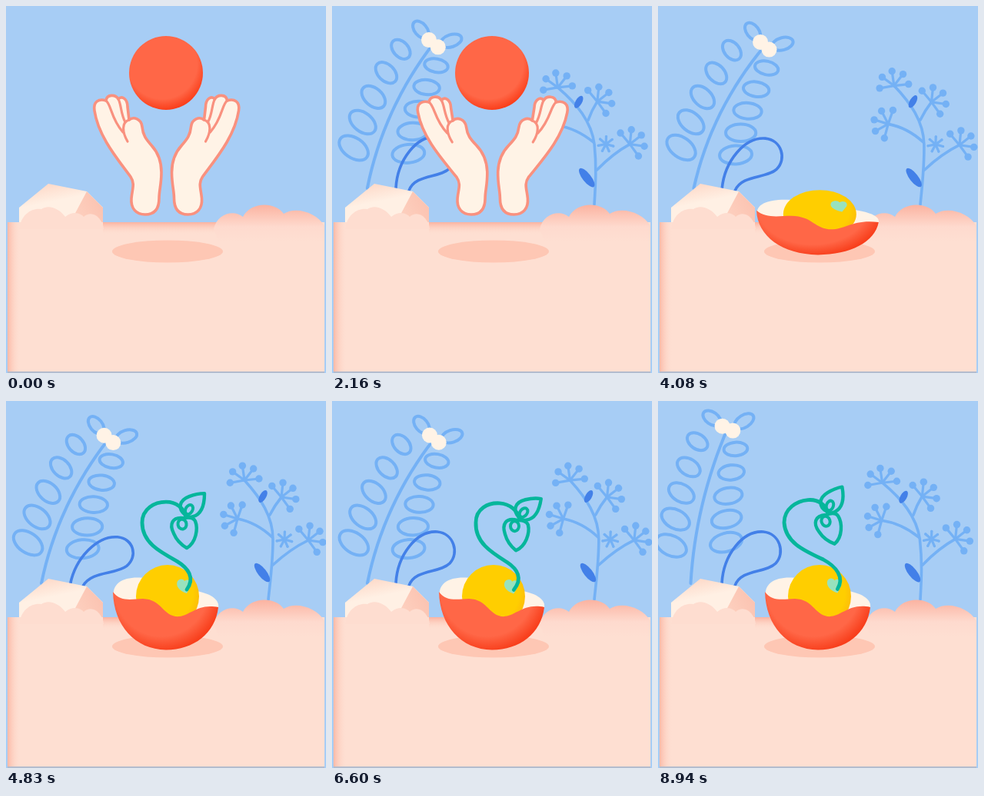
Animation, 416 px wide and 477 px high, one loop 8970 ms. Source, as an HTML page:

```html
<!DOCTYPE html>
<html lang="en">
<head>
<meta charset="utf-8">
<title>Sprouting egg</title>
<style>
  html, body { margin: 0; width: 100%; height: 100%; overflow: hidden; background: #a7cdf5; }
  svg { display: block; width: 100vw; height: 100vh; }
</style>
</head>
<body>
<svg viewBox="0 0 416 477">
  <defs>
    <radialGradient id="red" cx=".45" cy=".38" r=".63">
      <stop offset=".75" stop-color="#ff6747"/><stop offset="1" stop-color="#fa3c18"/>
    </radialGradient>
    <radialGradient id="bowl" gradientUnits="userSpaceOnUse" cx="202" cy="245" r="80">
      <stop offset=".76" stop-color="#ff6747"/><stop offset="1" stop-color="#f83f1c"/>
    </radialGradient>
    <radialGradient id="yolk" cx=".42" cy=".45" r=".6">
      <stop offset=".8" stop-color="#ffce00"/><stop offset="1" stop-color="#fdbd08"/>
    </radialGradient>
    <linearGradient id="top" x2="0" y2="1">
      <stop stop-color="#fbab97" stop-opacity=".85"/><stop offset="1" stop-color="#fedfd2" stop-opacity="0"/>
    </linearGradient>
    <linearGradient id="side">
      <stop stop-color="#fbb5a2" stop-opacity=".9"/><stop offset="1" stop-color="#fedfd2" stop-opacity="0"/>
    </linearGradient>
    <linearGradient id="bush" x2="0" y2="1">
      <stop stop-color="#fbb3a1"/><stop offset=".6" stop-color="#fedace"/><stop offset="1" stop-color="#fedfd2"/>
    </linearGradient>
    <linearGradient id="facet" x1="1" x2="0" y2=".6">
      <stop stop-color="#fbc0ae"/><stop offset="1" stop-color="#fdd0bf"/>
    </linearGradient>
    <linearGradient id="rock" x2=".4" y2="1">
      <stop stop-color="#fdd3c1"/><stop offset=".5" stop-color="#fff0e4"/>
    </linearGradient>
  </defs>
  <rect width="416" height="477" fill="#a7cdf5"/>
  <g id="plants"></g>
  <g id="ground">
    <path d="M17,284 V262 L55,231 L105,241 L126,262 V286 Z" fill="url(#rock)"/>
    <path d="M105,241 L126,262 V286 H100 L88,273 Z" fill="url(#facet)"/>
    <rect x="2" y="281" width="412" height="194" fill="#fedfd2"/>
    <rect x="2" y="475" width="412" height="2" fill="#b4bccd"/>
    <rect x="126" y="281" width="150" height="16" fill="url(#top)"/>
    <rect x="2" y="281" width="17" height="194" fill="url(#side)"/>
    <path d="M17,290 C20,270 34,262 46,264 C56,257 70,264 77,274 C90,264 99,272 101,274 C112,264 126,276 127,290 Z" fill="#feddd0"/>
    <path d="M270,290 C274,270 296,264 308,274 C318,254 350,254 361,270 C376,260 404,268 414,286 V306 H276 Z" fill="url(#bush)"/>
  </g>
  <g id="actors"></g>
</svg>
<script>
const LOOP = 8970, LAND = 4080;
const SKY_LINE = '#74b1f5', DEEP = '#4380e8', GREEN = '#06b69b', CREAM = '#fff3e6', SKIN_LINE = '#f9917f';
const plants = document.getElementById('plants'), actors = document.getElementById('actors');
const RAD = Math.PI / 180;
const clamp = x => Math.max(0, Math.min(1, x));
const ramp = (t, from, to) => { const x = clamp((t - from) / (to - from)); return x * x * (3 - 2 * x); };

// Eases from one [time, value] pose to the next.
function poses(keys, t) {
  let value = keys[0][1];
  for (let i = 1; i < keys.length; i++)
    value += (keys[i][1] - keys[i - 1][1]) * ramp(t, keys[i - 1][0], keys[i][0]);
  return value;
}

const warp = (d, move) => d.replace(/(-?[\d.]+),(-?[\d.]+)/g,
  (_, x, y) => move(+x, +y).map(v => v.toFixed(2)).join(','));
const stroke = (d, color, width, part = 1) => part <= 0 ? '' :
  `<path d="${d}" pathLength="1" fill="none" stroke="${color}" stroke-width="${width}" stroke-linecap="round" stroke-linejoin="round"${part < 1 ? ` stroke-dasharray="${part} 2"` : ''}/>`;
const shape = (d, fill, extra = '') => `<path d="${d}" fill="${fill}" ${extra}/>`;
const oval = (x, y, rx, ry, turn, style, scale = 1) => scale <= 0 ? '' :
  `<ellipse rx="${rx}" ry="${ry}" transform="translate(${x} ${y}) rotate(${turn}) scale(${scale})" ${style}/>`;
const outline = color => `fill="none" stroke="${color}" stroke-width="4"`;
const fill = color => `fill="${color}"`;

const FERN_LEAN = [[1200, 22], [3330, 28], [4830, 25], [5400, 19], [7980, 32], [8940, 13.4]];

function fern(t) {
  const grow = ramp(t, 100, 1150), lean = poses(FERN_LEAN, t), bend = .3 * lean + 6;
  const rootX = 41 + 25 * Math.sin((lean - bend) * RAD);
  const at = (u, side = 0, ahead = 0) => {
    const mean = (lean - bend + bend * u) * RAD, turn = lean - bend + 2 * bend * u;
    const c = Math.cos(turn * RAD), s = Math.sin(turn * RAD);
    return [rootX + 207 * u * Math.sin(mean) + side * c + ahead * s,
      237 - 207 * u * Math.cos(mean) + side * s - ahead * c, turn];
  };
  const leaf = (u, side, ahead, rx, ry, tilt) => {
    const k = clamp((grow * 1.2 - u) / .2), [x, y, turn] = at(Math.min(u, grow), side * k, ahead * k);
    return oval(x, y, rx, ry, turn + tilt, outline(SKY_LINE), k);
  };
  const points = Array.from({ length: 17 }, (_, i) => at(grow * i / 16).slice(0, 2).join(','));
  let out = grow ? stroke('M' + points.join('L'), SKY_LINE, 4) : '';
  for (let i = 0; i < 5; i++)
    out += leaf(.2 + .16 * i, -30, 4, 21 - 1.6 * i, 13 - .8 * i, 18 - i)
      + leaf(.28 + .14 * i, 40 - 5 * i, 2 + 2.5 * i, 21 - 1.4 * i, 12 - .8 * i, -24);
  out += leaf(1, -24, 4, 13, 8, 12) + leaf(1, 16, 17, 14, 8, -56);
  for (const side of [-7.5, 7.5])
    out += oval(...at(1, side).slice(0, 2), 10, 10, 0, fill(CREAM), clamp(grow * 6 - 5));
  return out;
}

// Each branch ends in an umbel that opens towards the given angle.
const BRANCHES = [
  ['M341,258 C344,230 347,208 347,180 C347,150 331,126 310,103', -98],
  ['M343,148 Q349,136 358,125', -38],
  ['M346,177 Q326,158 301,153', -163],
  ['M347,213 Q370,192 393,181', -38]
];
const BRANCH_SWAY = [[2160, -17], [4830, 0], [7980, -1], [8940, -19]];

function umbels(t) {
  const sway = poses(BRANCH_SWAY, t), bloom = ramp(t, 800, 1250);
  const move = (x, y) => {
    const dx = sway * Math.pow(Math.max(0, 258 - y) / 158, 1.5);
    return [x + dx, y + dx * (x - 345) / 200];
  };
  const rays = (x, y, count, length, from, step, dot) => {
    let out = '';
    for (let i = 0; i < count && bloom > 0; i++) {
      const a = (from + step * i) * RAD;
      const px = x + length * bloom * Math.cos(a), py = y + length * bloom * Math.sin(a);
      out += stroke(`M${x},${y} L${px},${py}`, SKY_LINE, 3.2) + oval(px, py, dot, dot, 0, fill(SKY_LINE), bloom);
    }
    return out;
  };
  let out = '';
  BRANCHES.forEach(([path, aim], i) => {
    const d = warp(path, move), [x, y] = d.split(' ').pop().split(',').map(Number);
    out += stroke(d, SKY_LINE, 3.6, ramp(t, i ? 550 : 150, 950)) + rays(x, y, 5, 19, aim - 92, 46, 4.7);
  });
  return out + rays(...move(362, 180), 7, 10, 15, 360 / 7, 1.6)
    + oval(...move(334, 124), 4.2, 9, 30, fill(DEEP), bloom)
    + oval(...move(333, 223), 5.5, 15, -38, fill(DEEP), bloom);
}

const TENDRIL = 'M83,237 C85,200 110,168 137,170 C158,172 166,197 153,211 C140,224 108,218 100,240';
function tendril(t) {
  const sway = 8 * Math.exp(-(((t - 4830) / 700) ** 2));
  const move = (x, y) => { const k = sway * clamp((242 - y) / 62); return [x + k, y + k * .85]; };
  return stroke(warp(TENDRIL, move), DEEP, 3.6, ramp(t, 200, 1200));
}

const HAND = 'M181,271 C169,271 162,263 163,250 C164,238 168,231 162,222 C146,200 120,170 115,136 C113,124 121,120 130,123 C131,114 143,115 146,121 C151,116 158,121 158,131 L160,148 C166,143 176,147 177,157 C178,168 182,173 189,181 C199,192 202,203 202,216 C202,232 199,240 199,250 C199,264 193,271 181,271 Z';
const CREASES = ['M130,123 C137,128 136,146 152,164', 'M146,121 C150,128 149,140 155,151', 'M160,148 C150,151 151,164 158,176'];
const TOSS = [[2600, 0], [2950, -20], [3330, 99], [3620, 330]];

function hands(t) {
  if (t > 3620) return '';
  const rise = poses(TOSS, t), lift = Math.max(0, rise);
  const angle = Math.min(18, 2.2 * Math.sin(Math.PI * t / 4320) + .125 * lift);
  const move = (x, y) => {
    const a = -angle * ramp(-y, -262, -195) * RAD, c = Math.cos(a), s = Math.sin(a), dx = x - 182, dy = y - 222;
    return [182 + dx * c - dy * s - .16 * lift, 222 + dx * s + dy * c - rise];
  };
  const hand = shape(warp(HAND, move), CREAM, `stroke="${SKIN_LINE}" stroke-width="3.6" stroke-linejoin="round"`)
    + CREASES.map(d => stroke(warp(d, move), SKIN_LINE, 3.2)).join('');
  return hand + `<g transform="translate(417.5 0) scale(-1 1)">${hand}</g>`;
}

const ballY = t => t < 3700 ? 87 - .93 * poses(TOSS, t) : 445 * ((t - 3700) / (LAND - 3700)) ** 2 - 170;

const SHELL_BACK = 'M140,255 C137,234 158,226 186,231 L248,247 C268,251 278,259 276,269 L222,290 Z';
const SHELL_FRONT = 'M139,248 C149,262 165,257 178,257 C202,258 202,276 220,280 C238,282 247,262 276,268 C272,302 244,323.500 208,323.500 C168,323 140,292 139,248 Z';
const SPROUT = 'M235,245 C246,230 237,217 222,208 C200,196 177,184 177,158 C177,140 193,131 208,131 C222,131 231,140 233,148';
const SPROUT_LEAVES = [
  'M233,148 C223,140 225,129 238,124 Q248,120 258,120 C258,135 254,147 243,150 Q237,152 233,148 Z',
  'M231,152 C216,150 212,160 218,172 Q223,184 235,191 C247,184 250,166 246,156 C243,150 236,151 231,152 Z'
];
const SEED = 'M235,250 C225,247 220,240 223,234 C226,230 231,231 232,234 C238,230 242,235 240,241 Z';
const SPROUT_SWAY = [[4830, 0], [6600, 10], [7980, -15], [8940, -13]];

function sprout(t) {
  const sway = poses(SPROUT_SWAY, t), open = ramp(t, 4560, 4820);
  const move = (x, y) => {
    const k = sway * (.12 + .88 * ramp(-y, -250, -165));
    return [x + k, y + k * .33 * clamp((x - 180) / 50)];
  };
  const [x, y] = move(233, 149);
  const leaves = open <= 0 ? '' :
    `<g transform="translate(${x} ${y}) rotate(${sway * .8}) scale(${open}) translate(-233 -149)">`
    + SPROUT_LEAVES.map(d => stroke(d, GREEN, 4.4)).join('')
    + oval(238, 141, 4.5, 6.5, 30, outline(GREEN)) + oval(229, 160, 5.5, 6.5, -10, outline(GREEN)) + '</g>';
  return shape(warp(SEED, move), '#98e2bd') + stroke(warp(SPROUT, move), GREEN, 4.8, ramp(t, 4220, 4680)) + leaves;
}

function egg(t) {
  const age = t - LAND, squash = Math.exp(-age / 130) * Math.cos(age / 62);
  return `<g transform="translate(208 323) scale(${1 + .16 * squash} ${1 - .24 * squash}) translate(-208 -323)">`
    + shape(SHELL_BACK, CREAM) + oval(210, 254, 41, 41, 0, fill('url(#yolk)'))
    + shape(SHELL_FRONT, 'url(#bowl)') + sprout(t) + '</g>';
}

function draw(t) {
  const y = ballY(t), shadow = clamp(1 - (87 - y) * .005);
  plants.innerHTML = fern(t) + umbels(t) + tendril(t);
  actors.innerHTML = oval(210, 319, 72, 14.5, 0, fill('#fec7b4'), shadow)
    + (t < LAND ? oval(208, y, 48, 48, 0, fill('url(#red)')) : egg(t)) + hands(t);
}

const start = performance.now();
function tick() {
  draw((performance.now() - start) % LOOP);
  requestAnimationFrame(tick);
}
tick();
</script>
</body>
</html>
```
